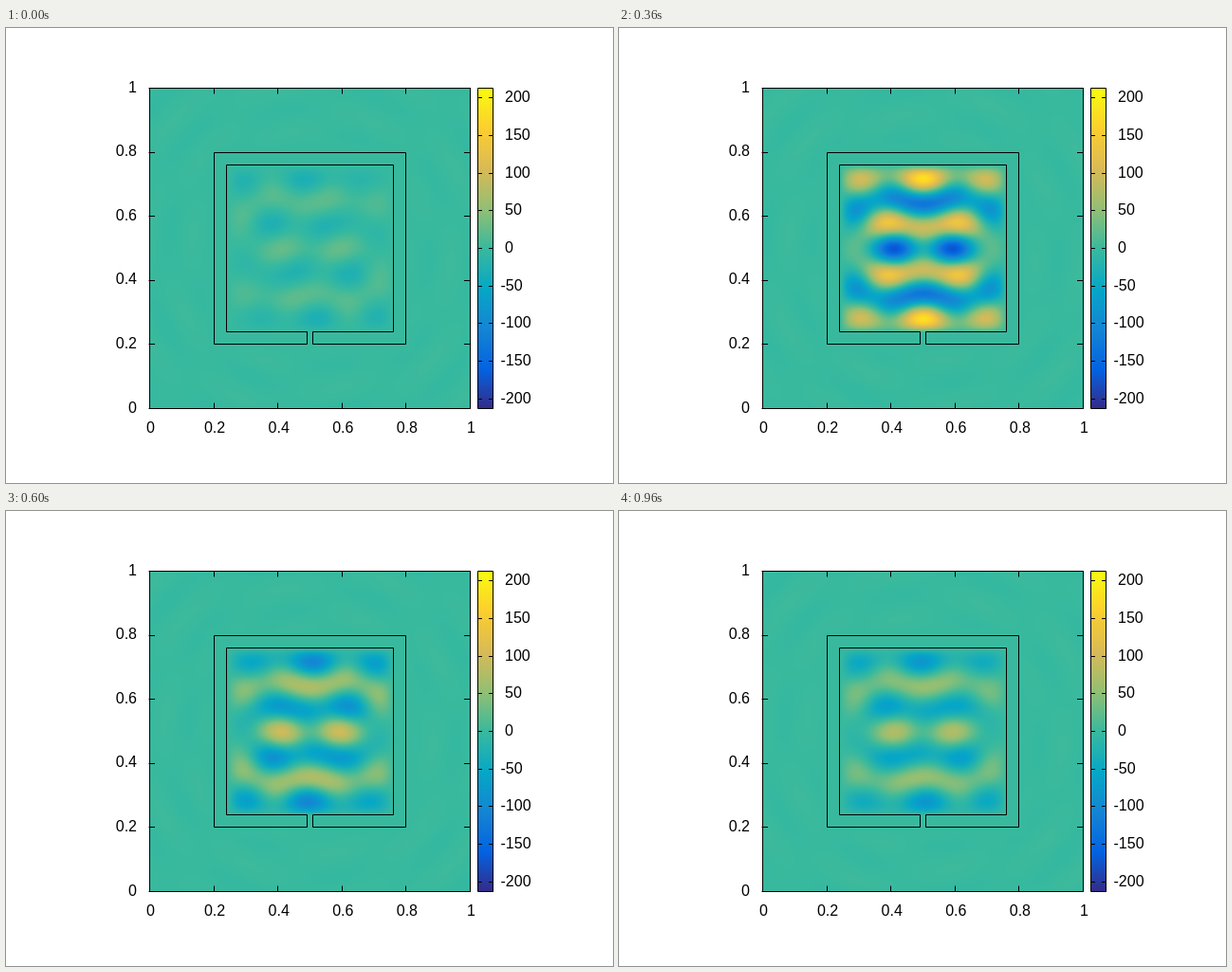
Write an HTML page with a canvas that moves like this. It is 640 px wide and 480 px high and loops after 1000 ms.

```html
<!DOCTYPE html>
<html lang="en">
<head>
<meta charset="utf-8">
<title>Cavity mode</title>
<style>
  html, body { margin: 0; width: 100%; height: 100%; overflow: hidden; background: #fff; }
  canvas, svg { position: absolute; left: 0; top: 0; width: 640px; height: 480px; display: block; }
  text { font: 16px "Liberation Sans", Arial, sans-serif; fill: #000; white-space: pre; }
  path { fill: none; stroke: #000; stroke-width: 1; }
</style>
</head>
<body>
<canvas id="field" width="640" height="480"></canvas>
<svg id="axes" viewBox="0 0 640 480"></svg>
<script>
const { PI, sin, cos, hypot, atan2, min, max, floor } = Math;
const LOOP = 1000, STEP = 40, RANGE = 213;
const LEFT = 151.5, TOP = 63.5, SIZE = 338;
const stops = ["352a87", "0363e1", "1485d4", "06a7c6", "38b99e", "92bf73", "d9ba56", "fcce2e", "f9fb0e"]
  .map(h => [0, 2, 4].map(i => parseInt(h.slice(i, i + 2), 16)));

// Colour ramp, packed RGB triples over -RANGE..RANGE
const RAMP = 1024;
const ramp = new Uint8ClampedArray(RAMP * 3);
for (let i = 0; i < RAMP; i++) {
  const p = i / (RAMP - 1) * (stops.length - 1);
  const n = min(floor(p), stops.length - 2);
  for (let c = 0; c < 3; c++) {
    ramp[i * 3 + c] = stops[n][c] + (stops[n + 1][c] - stops[n][c]) * (p - n);
  }
}
const rampIndex = v => 3 * max(0, min(RAMP - 1, Math.round((v / RANGE + 1) / 2 * (RAMP - 1))));

// Standing waves of the inner square, plus a faint ripple outside the wall
const mode = (m, n, u, v) => sin(m * PI * u) * sin(n * PI * v);
const main = new Float32Array(SIZE * SIZE);
const skew = new Float32Array(SIZE * SIZE);
const rippleA = new Float32Array(SIZE * SIZE);
const rippleB = new Float32Array(SIZE * SIZE);
for (let j = 0; j < SIZE; j++) {
  for (let i = 0; i < SIZE; i++) {
    const k = j * SIZE + i;
    const x = (i + 0.5) / SIZE, y = 1 - (j + 0.5) / SIZE;
    const u = (x - 0.24) / 0.52, v = (y - 0.24) / 0.52;
    if (u > 0 && u < 1 && v > 0 && v < 1) {
      main[k] = 136 * mode(1, 7, u, v) + 81 * mode(5, 5, u, v) - 20 * mode(7, 1, u, v);
      skew[k] = 11 * mode(6, 4, u, v);
    }
    const dx = x - 0.5, dy = y - 0.5;
    const gap = max(Math.abs(dx), Math.abs(dy)) - 0.3;
    if (gap > 0) {
      const r = hypot(dx, dy), a = atan2(dy, dx);
      const amp = 3 * min(1, gap / 0.04) * cos(5 * a + 0.6);
      rippleA[k] = amp * cos(42.7 * r);
      rippleB[k] = amp * sin(42.7 * r);
    }
  }
}

const ctx = document.getElementById("field").getContext("2d");
const img = ctx.createImageData(SIZE, SIZE);
img.data.fill(255);

function drawField(t) {
  const w = 2 * PI / LOOP;
  const p = -sin(w * (t - 520));
  const q = cos(w * (t - 100));
  const ca = cos(w * t), sb = sin(w * t);
  for (let k = 0, o = 0; k < main.length; k++, o += 4) {
    const c = rampIndex(p * main[k] + q * skew[k] + ca * rippleA[k] + sb * rippleB[k]);
    img.data[o] = ramp[c];
    img.data[o + 1] = ramp[c + 1];
    img.data[o + 2] = ramp[c + 2];
  }
  ctx.putImageData(img, 152, 64);
}

function drawBar() {
  for (let j = 0; j < SIZE; j++) {
    const c = rampIndex(RANGE * (1 - 2 * (j + 0.5) / SIZE));
    ctx.fillStyle = `rgb(${ramp[c]},${ramp[c + 1]},${ramp[c + 2]})`;
    ctx.fillRect(498, 64 + j, 16, 1);
  }
}

function drawAxes() {
  const right = LEFT + SIZE, bottom = TOP + SIZE;
  const snap = n => floor(n) + 0.5;
  let d = `M${LEFT} ${TOP}H${right}V${bottom}H${LEFT}Z M497.5 ${TOP}H513.5V${bottom}H497.5Z`;
  let labels = "";
  const label = (x, y, s, anchor) => {
    labels += `<text x="${x}" y="${y}" text-anchor="${anchor}">${s}</text>`;
  };
  for (let i = 0; i <= 5; i++) {
    const x = snap(LEFT + i * SIZE / 5), y = snap(bottom - i * SIZE / 5);
    d += `M${x} ${bottom}v-6M${x} ${TOP}v6M${LEFT - 1} ${y}h6.5M${right} ${y}h-6.5`;
    const s = String(i * 2 / 10);
    label(152.5 + i * SIZE / 5, 426.5, s, "middle");
    label(138, 405.5 - i * SIZE / 5, s, "end");
  }
  for (let v = -200; v <= 200; v += 50) {
    const y = 232.5 - v * SIZE / (2 * RANGE);
    d += `M497.5 ${snap(y)}h4.5M513.5 ${snap(y)}h-4.5`;
    label(v < 0 ? 521.5 : 526, y + 4.5, v, "start");
  }
  // Wall with a slit at the bottom
  d += "M317.5 320.5V333.5H219.5V131.5H421.5V333.5H323.5V320.5H408.5V144.5H232.5V320.5Z";
  document.getElementById("axes").innerHTML = `<path d="${d}"/>${labels}`;
}

let shown = -1;
function tick(now) {
  const step = floor(max(0, now - start) % LOOP / STEP);
  if (step !== shown) {
    shown = step;
    drawField(step * STEP);
  }
  requestAnimationFrame(tick);
}

drawBar();
drawAxes();
const start = performance.now();
tick(start);
</script>
</body>
</html>
```
